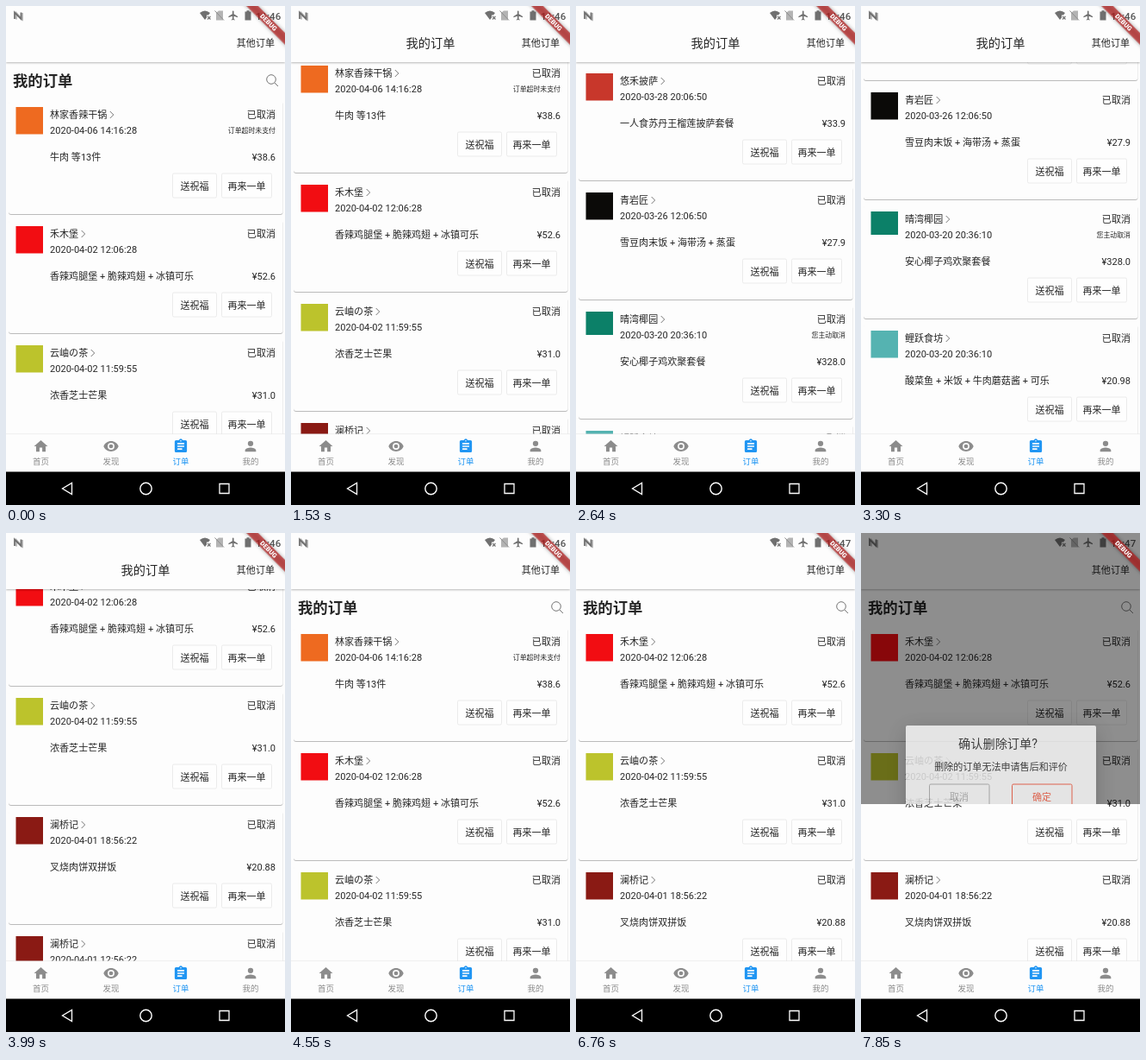
These frames come from a looping animation (324x578 px, 8 s). An HTML page:

```html
<!DOCTYPE html>
<html lang="zh-CN">
<head>
<meta charset="utf-8">
<title>我的订单</title>
<style>
html, body { margin: 0; width: 100%; height: 100%; overflow: hidden; background: #fdfdfd; }
svg { display: block; width: 324px; height: 578px; }
text { font-family: Roboto, "Noto Sans CJK SC", "Noto Sans CJK", sans-serif; }
.card { filter: drop-shadow(.2px 1px .5px rgba(0, 0, 0, .26)); }
.bar { filter: drop-shadow(0 1px 1.2px rgba(0, 0, 0, .28)); }
.box { filter: drop-shadow(0 6px 12px rgba(0, 0, 0, .24)); }
</style>
</head>
<body>
<svg viewBox="0 0 324 578">
  <defs>
    <clipPath id="page"><rect y="65" width="324" height="431"/></clipPath>
    <clipPath id="veil"><rect id="veilRect" width="324" height="540"/></clipPath>
  </defs>
  <rect width="324" height="578" fill="#fdfdfd"/>
  <g clip-path="url(#page)"><g id="list"></g></g>
  <g id="chrome"></g>
  <g clip-path="url(#veil)">
    <rect id="dim" width="324" height="540"/>
    <g id="dialog"></g>
  </g>
  <g id="top"></g>
</svg>
<script>
const INK = '#262626', GREY = '#8c8c8c', BLUE = '#2196f3', RED = '#f4553a';
const PITCH = 138, LOOP = 8000;
const $ = id => document.getElementById(id);

const rect = (x, y, w, h, fill, extra = '') =>
  `<rect x="${x}" y="${y}" width="${w}" height="${h}" fill="${fill}" ${extra}/>`;

// y is the middle of the glyphs
const text = (x, y, str, {size = 11.05, fill = INK, anchor = 'start', extra = ''} = {}) =>
  `<text x="${x}" y="${y + size * .37}" font-size="${size}" fill="${fill}" text-anchor="${anchor}" ${extra}>${str}</text>`;

const line = (d, color, w = 1) => `<path d="${d}" fill="none" stroke="${color}" stroke-width="${w}"/>`;

const icon = (x, y, d, fill, scale = .79) =>
  `<path transform="translate(${x} ${y}) scale(${scale}) translate(-12 -12)" fill="${fill}" d="${d}"/>`;

// name, date, dishes, price, logo colour, note
const orders = [
  ['林家香辣干锅', '04-06 14:16:28', '牛肉 等13件', '38.6', '#ee6a20', '订单超时未支付'],
  ['禾木堡', '04-02 12:06:28', '香辣鸡腿堡 + 脆辣鸡翅 + 冰镇可乐', '52.6', '#f20d12'],
  ['云岫の茶', '04-02 11:59:55', '浓香芝士芒果', '31.0', '#bcc32c'],
  ['澜桥记', '04-01 18:56:22', '叉烧肉饼双拼饭', '20.88', '#8a1a14'],
  ['澜桥记', '04-01 12:56:22', '叉烧肉饼双拼饭', '20.88', '#8a1a14'],
  ['渔舟寿司', '03-30 14:37:26', '三文鱼寿司组合', '71.3', '#f7c63a'],
  ['清晨大碗', '03-29 08:56:28', '非矾油条 + 现磨豆浆（热）', '13.0', '#f2101e'],
  ['悠禾披萨', '03-28 20:06:50', '一人食苏丹王榴莲披萨套餐', '33.9', '#c8372b'],
  ['青岩匠', '03-26 12:06:50', '雪豆肉末饭 + 海带汤 + 蒸蛋', '27.9', '#0b0a08'],
  ['晴湾椰园', '03-20 20:36:10', '安心椰子鸡欢聚套餐', '328.0', '#0c8068', '您主动取消'],
  ['鲤跃食坊', '03-20 20:36:10', '酸菜鱼 + 米饭 + 牛肉蘑菇酱 + 可乐', '20.98', '#55b3b1']
];

const button = (x, w, label) =>
  rect(x + .5, 68, w, 28, '#fefefe', 'rx="1.5" stroke="#ebebeb"') +
  text(x + w / 2 + .5, 82.8, label, {anchor: 'middle'});

function order([name, date, dishes, price, color, note = ''], i) {
  const tip = 51 + name.length * 11.05 + 3.5;
  const end = {anchor: 'end'};
  return `<g id="order${i}">` +
    rect(3, -16, 318.5, 131, '#fdfdfd', 'rx="3" class="card"') +
    rect(11.5, -9, 31.5, i == 9 ? 27 : 31.5, color, `id="logo${i}"`) +
    text(51, 0, name) + line(`M${tip} -4l4 4l-4 4`, '#777') +
    text(51, 18.3, '2020-' + date) +
    text(313, 0, '已取消', end) +
    text(313, 18.5, note, {size: 7.9, anchor: 'end'}) +
    text(51, 48.5, dishes) + text(313, 48.5, '¥' + price, end) +
    button(193, 51, '送祝福') + button(250, 58, '再来一单') + '</g>';
}

$('list').innerHTML =
  text(8, 87, '我的订单', {size: 17.35, extra: 'font-weight="700"'}) +
  '<circle cx="308" cy="85" r="5.3" fill="none" stroke="#777"/>' + line('M312 89l4 4', '#777') +
  orders.map(order).join('');

const tabs = [
  ['首页', 40.5, 'M10 20v-6h4v6h5v-8h3L12 3 2 12h3v8z'],
  ['发现', 122, 'M12 4.5C7 4.5 2.7 7.6 1 12c1.7 4.4 6 7.5 11 7.5s9.3-3.1 11-7.5c-1.7-4.4-6-7.5-11-7.5zM12 17a5 5 0 1 1 0-10 5 5 0 0 1 0 10zm0-8a3 3 0 1 0 0 6 3 3 0 0 0 0-6z'],
  ['订单', 203, 'M19 3h-4.2a3 3 0 0 0-5.6 0H5a2 2 0 0 0-2 2v14a2 2 0 0 0 2 2h14a2 2 0 0 0 2-2V5a2 2 0 0 0-2-2zm-7 0a1 1 0 1 1 0 2 1 1 0 0 1 0-2zm2 14H7v-2h7zm3-4H7v-2h10zm0-4H7V7h10z'],
  ['我的', 284, 'M12 12a4 4 0 1 0 0-8 4 4 0 0 0 0 8zm0 2c-2.7 0-8 1.3-8 4v2h16v-2c0-2.7-5.3-4-8-4z']
];

const plane = 'M21 16v-2l-8-5V3.5a1.5 1.5 0 0 0-3 0V9l-8 5v2l8-2.5V19l-2 1.5V22l3.5-1 3.5 1v-1.5L13 19v-5.5z';
const status = '#707070', faint = '#b4b4b4';

$('chrome').innerHTML =
  rect(0, 0, 324, 65, '#fdfdfd', 'class="bar"') +
  text(162, 43, '我的订单', {size: 14.2, anchor: 'middle', extra: 'id="heading" font-weight="500"'}) +
  text(312, 43, '其他订单', {anchor: 'end'}) +
  // status icons
  line('M12 15.500V8l7 7.500V8', faint, 1.8) + line('M10 15V7.500l7.500 7.500V7.500', status, 1.8) +
  `<path fill="${status}" d="M225 8q6-5 12 0l-2 2.5h-2v3l-2 2.5z"/>` + line('M234 12l3.5 3.5m0-3.5l-3.5 3.5', status, 1.1) +
  `<path fill="${faint}" d="M244 8l3-2.5h5v11h-8z"/>` + line('M242.5 5.5l10.5 11', GREY) +
  icon(264, 11, plane, status, .56) +
  `<path fill="${status}" d="M277.5 6.500h2v-1.2h3v1.2h2v10h-7z"/>` +
  text(290, 11.3, '', {size: 11.5, fill: '#555', extra: 'id="clock" font-weight="500"'}) +
  // bottom tabs
  rect(0, 496, 324, 44, '#fdfdfd') + rect(0, 495.5, 324, .6, '#e6e6e6') +
  tabs.map(([label, x, d], i) => {
    const fill = i == 2 ? BLUE : GREY;
    return icon(x, 510, d, fill) + text(x, 527.5, label, {size: 9.5, fill, anchor: 'middle'});
  }).join('');

const choice = (x, label, color, id) =>
  rect(x + .5, 291, 69.5, 28.5, '#fff', `id="${id}" rx="1.5" stroke="${color}"`) +
  text(x + 35, 305.5, label, {fill: color, anchor: 'middle'});

$('dialog').innerHTML =
  rect(52, 223, 221, 114, '#fff', 'rx="2" class="box"') +
  text(159, 244.2, '确认删除订单?', {size: 14.2, anchor: 'middle'}) +
  text(162.5, 271, '删除的订单无法申请售后和评价', {anchor: 'middle'}) +
  choice(79, '取消', '#aaa', 'no') + choice(175, '确定', RED, 'yes');

$('top').innerHTML =
  '<g transform="translate(324 0) rotate(45)">' +
  rect(-45, 22.1, 90, 9.5, '#b71c1c', 'fill-opacity=".7" style="filter:drop-shadow(0 0 2px rgba(0,0,0,.5))"') +
  text(0, 26.8, 'DEBUG', {size: 7.6, fill: '#fff', anchor: 'middle', extra: 'font-weight="900"'}) + '</g>' +
  rect(0, 539.5, 324, 38.5, '#000') +
  line('M76.5 552.5v13l-11-6.5z', '#fff', 1.3) +
  '<circle cx="162.5" cy="559" r="6.7" fill="none" stroke="#fff" stroke-width="1.4"/>' +
  line('M248 553.5h11v11h-11z', '#fff', 1.3);

// [time, scroll]
const scrolls = [[0, 0], [1530, 48], [1680, 150], [1960, 310], [2090, 555], [2220, 764], [2370, 880],
  [2500, 955], [2640, 1005], [2790, 1032], [2940, 1045], [3060, 1072], [3300, 1121], [3450, 930],
  [3570, 800], [3840, 470], [3990, 202], [4120, 92], [4260, 38], [4400, 12], [4550, 0]];
// [time, dim, dialog opacity, veil height]
const veils = [[0, 0, 0, 540], [5400, .54, 1, 540], [6060, .44, .75, 540],
  [6200, .18, .3, 540], [6340, 0, 0, 540], [7850, .44, .77, 314]];
const PRESS = 5920, REMOVE = 6340;

const at = (steps, t) => steps.findLast(step => step[0] <= t);

function draw(t) {
  const scroll = at(scrolls, t)[1];
  const [, dim, shown, height] = at(veils, t);
  const removed = t >= REMOVE ? 1 : 0;

  $('list').setAttribute('transform', `translate(0 ${-scroll})`);
  orders.forEach((o, i) => {
    const g = $('order' + i);
    g.setAttribute('transform', `translate(0 ${126 + PITCH * (i - removed)})`);
    g.style.display = i < removed ? 'none' : '';
  });
  for (const i of [7, 8]) $('logo' + i).setAttribute('fill', t < 2500 ? '#ececec' : orders[i][4]);
  $('heading').style.display = scroll > 25 ? '' : 'none';
  $('clock').textContent = t < 5400 ? '11:46' : '11:47';

  $('dim').setAttribute('opacity', dim);
  $('dialog').setAttribute('opacity', shown);
  $('veilRect').setAttribute('height', height);
  $('yes').setAttribute('fill', t >= PRESS && t < REMOVE ? '#fbe4df' : '#fff');
}

function tick() {
  draw(performance.now() % LOOP);
  requestAnimationFrame(tick);
}
tick();
</script>
</body>
</html>
```
